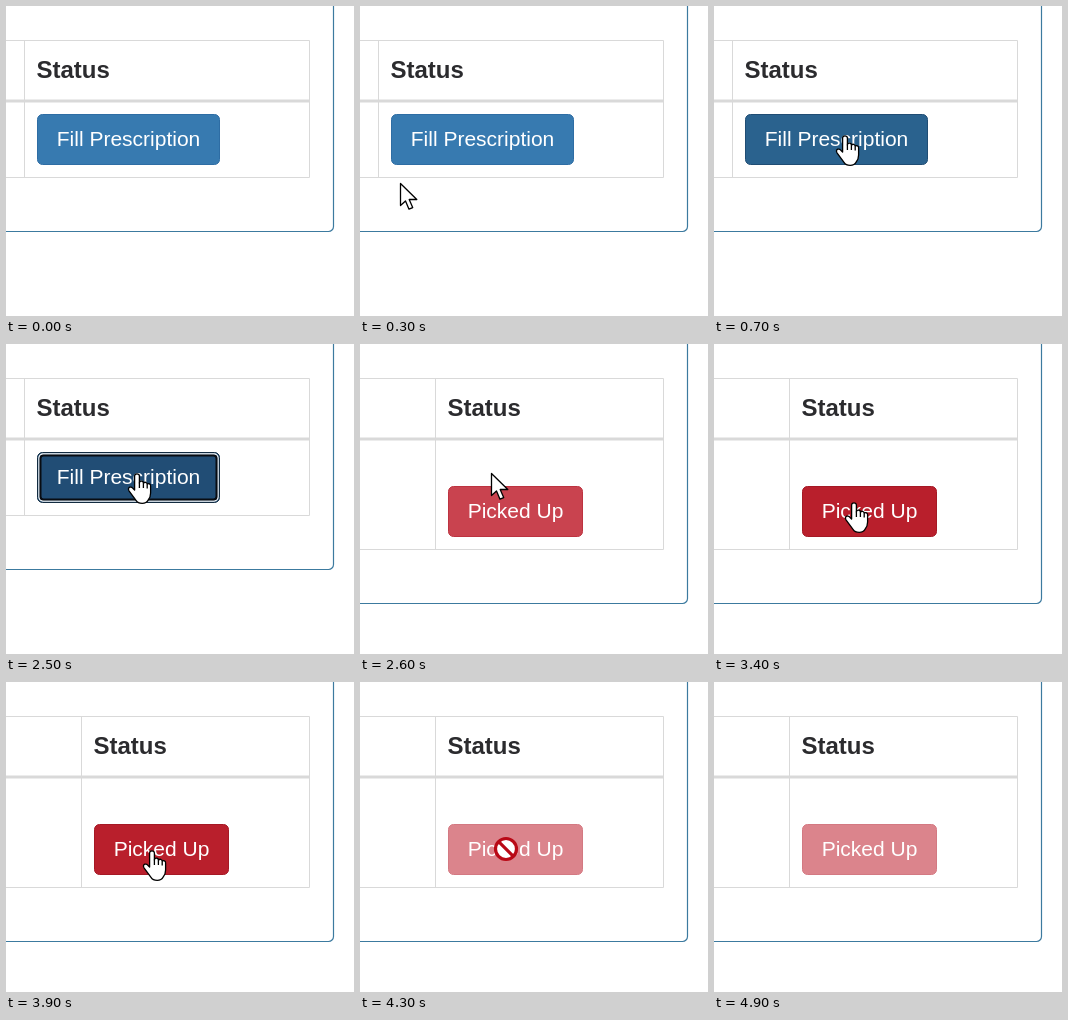
An HTML page for the animation above (6800 ms loop, 348 by 310 pixels).

```html
<!DOCTYPE html>
<html lang="en">
<head>
<meta charset="utf-8">
<title>Prescription status</title>
<style>
  html, body { margin: 0; width: 100%; height: 100%; overflow: hidden; background: #fff; }
  svg { display: block; width: 348px; height: 310px; font-family: "Liberation Sans", Arial, sans-serif; }
  .cell { fill: none; stroke: #d9d9d9; }
  .pointer { fill: #fff; stroke: #000; stroke-width: 1.3; stroke-linejoin: round; }
  .ban { fill: #fff; stroke: #b90916; stroke-width: 3.2; }
</style>
</head>
<body>
<svg viewBox="0 0 348 310">
  <rect id="panel" x="-20.5" y="-20.5" width="348" rx="5" fill="#fff" stroke="#3c7a9f" stroke-width="1.2"/>
  <path id="grid" class="cell"/>
  <path class="cell" d="M0 95H304" stroke-width="3"/>
  <text id="heading" y="72" font-size="24" font-weight="bold" fill="#2b2b2e">Status</text>
  <g id="button">
    <rect id="face" height="50" rx="5"/>
    <g id="ring" fill="none">
      <rect id="halo" height="47" rx="4" stroke="#fff" stroke-width="1.4"/>
      <rect id="edge" height="44" rx="3" stroke="#080c12" stroke-width="2"/>
    </g>
    <text id="label" font-size="21" fill="#fff" text-anchor="middle"></text>
  </g>
  <g id="cursor">
    <path id="arrow" class="pointer" d="M.5 .5V22.5L5.5 17.9 9 26.2 12.7 24.6 9.2 16.5H16.8Z"/>
    <g id="hand" class="pointer">
      <path d="M-2.4 17V3.2a2.4 2.4 0 0 1 4.8 0V10a2 2 0 0 1 4 .4 2 2 0 0 1 3.8 .9 2 2 0 0 1 3.4 1.6V20Q13.6 24 11.2 27 9.5 30.4 5.2 30.4 .8 30.4-1 27.4L-8 17.8Q-9.4 15.2-7.2 14.2-5.5 13.6-4.2 15.2Z"/>
      <path d="M2.4 9.5V15M6.4 10.5V15M10.2 11.5V15.5" fill="none"/>
    </g>
    <g id="ban" class="ban"><circle r="10.5"/><path d="M-7.4-7.4 7.4 7.4"/></g>
  </g>
</svg>
<script>
const LOOP = 6800;
const $ = id => document.getElementById(id);
const set = (id, attrs) => {
  for (const name in attrs) $(id).setAttribute(name, attrs[name]);
};

const views = {
  fill: {
    text: 'Fill Prescription', left: 31, top: 108, width: 182,
    rest: ['#377ab0', '#2e6da4'], hover: ['#2a628e', '#204d74'], active: ['#214d75', '#122b40']
  },
  pickup: {
    text: 'Picked Up', left: 88, top: 142, width: 134,
    rest: ['#c9434f', '#bd3340'], hover: ['#b91f2c', '#a51925'], active: ['#9c1925', '#6f101a'],
    disabled: ['#c9434f', '#bd3340']
  }
};

// Each step holds until the next: time, view, button state, pointer, x, y
const steps = [
  [0, 'fill', 'rest'],
  [200, 'fill', 'rest', 'arrow', 3, 196],
  [300, 'fill', 'rest', 'arrow', 40, 177],
  [400, 'fill', 'hover', 'hand', 80, 156],
  [500, 'fill', 'hover', 'hand', 108, 141],
  [600, 'fill', 'hover', 'hand', 124, 132],
  [700, 'fill', 'hover', 'hand', 131, 129],
  [2500, 'fill', 'active', 'hand', 131, 129],
  [2600, 'pickup', 'rest', 'arrow', 131, 129],
  [3300, 'pickup', 'hover', 'hand', 136, 145],
  [3400, 'pickup', 'hover', 'hand', 140, 158],
  [3500, 'pickup', 'hover', 'hand', 138, 174],
  [3600, 'pickup', 'hover', 'hand', 136, 181],
  [3800, 'pickup', 'hover', 'hand', 141, 174],
  [3900, 'pickup', 'hover', 'hand', 146, 168],
  [4200, 'pickup', 'active', 'hand', 146, 168],
  [4300, 'pickup', 'disabled', 'ban', 146, 167],
  [4400, 'pickup', 'disabled', 'ban', 154, 167],
  [4700, 'pickup', 'disabled', 'ban', 112, 180],
  [4800, 'pickup', 'disabled', 'arrow', 11, 202],
  [4900, 'pickup', 'disabled']
];

function drawView(name, state) {
  const { text, left, top, width, [state]: [fill, stroke] } = views[name];
  const bottom = top + 63.5;
  set('panel', { height: top + 138 });
  set('grid', { d: `M0 34.5H303.5V${bottom}H0M${left - 12.5} 34V${bottom}` });
  set('heading', { x: left - .5 });
  set('button', { opacity: state === 'disabled' ? .65 : 1 });
  set('face', { x: left + .5, y: top + .5, width, fill, stroke });
  set('ring', { visibility: state === 'active' ? 'visible' : 'hidden' });
  set('halo', { x: left + 2, y: top + 2, width: width - 3 });
  set('edge', { x: left + 3.5, y: top + 3.5, width: width - 6 });
  set('label', { x: left + .5 + width / 2, y: top + 32 });
  $('label').textContent = text;
}

function drawCursor(pointer, x = 0, y = 0) {
  for (const id of ['arrow', 'hand', 'ban'])
    set(id, { visibility: id === pointer ? 'visible' : 'hidden' });
  set('cursor', { transform: `translate(${x} ${y})` });
}

const start = performance.now();
let shown;
function frame() {
  const time = (performance.now() - start) % LOOP;
  const step = steps.findLast(([from]) => from <= time);
  if (step !== shown) {
    const [, view, state, ...cursor] = shown = step;
    drawView(view, state);
    drawCursor(...cursor);
  }
  requestAnimationFrame(frame);
}
frame();
</script>
</body>
</html>
```
